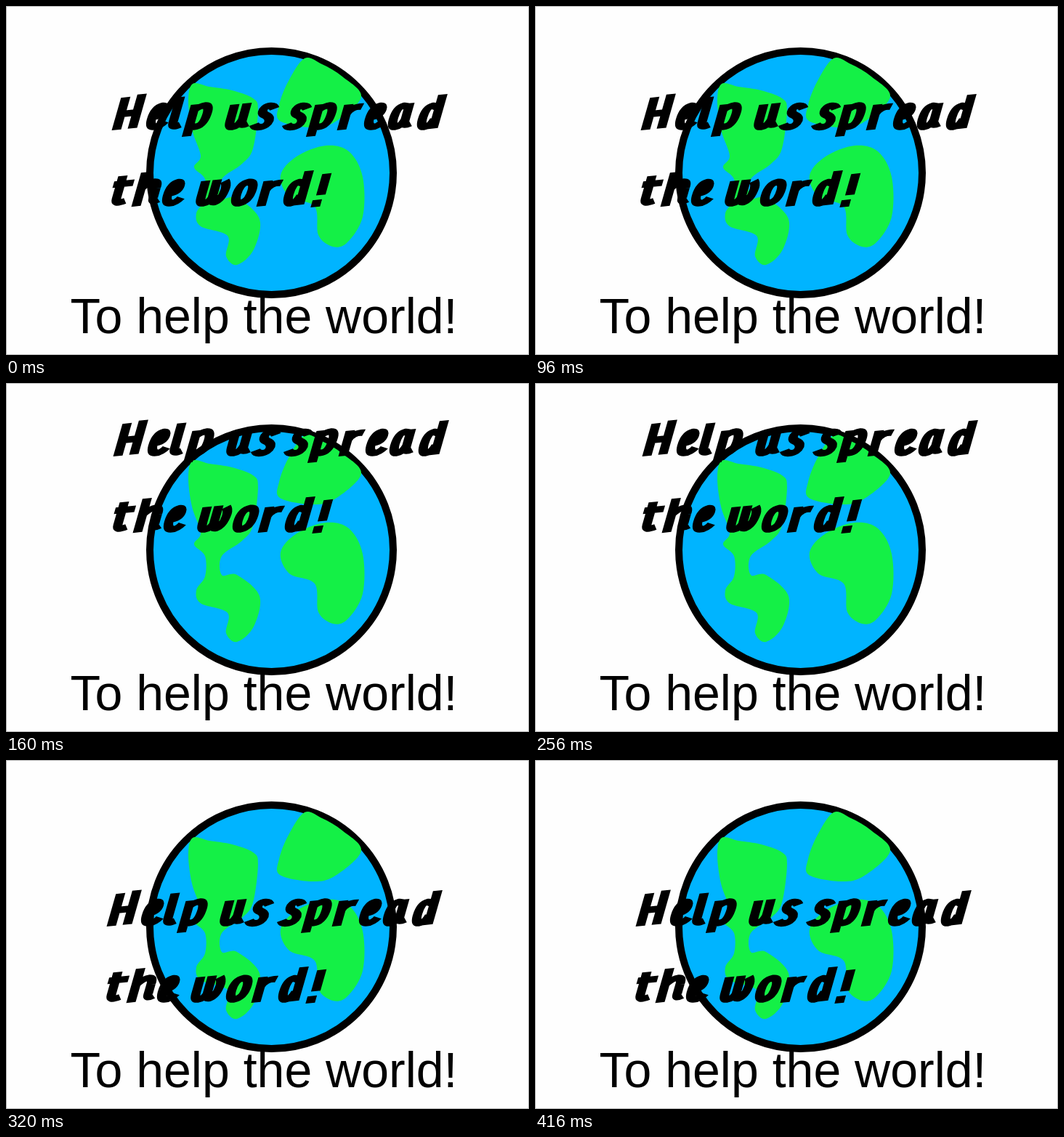
Animation of 720x480 px, one loop 480 ms. Source, as an HTML page:

```html
<!DOCTYPE html>
<html lang="en">
<head>
<meta charset="utf-8">
<title>Help us spread the word!</title>
<style>
  html, body { margin: 0; width: 100%; height: 100%; overflow: hidden; background: #fefefe; }
  svg { display: block; width: 720px; height: 480px; }
  #lands { fill: #14f046; }
  #slogan { fill: none; stroke: #000; stroke-width: 13; stroke-linejoin: round; }
  .caption { font: 68px "Liberation Sans", Arial, sans-serif; }
</style>
</head>
<body>
<svg viewBox="0 0 720 480">
  <rect width="720" height="480" fill="#fefefe"/>
  <circle cx="365.5" cy="229.5" r="167.5" fill="#00b4ff" stroke="#000" stroke-width="10"/>
  <g id="lands"></g>
  <text class="caption" x="88.5" y="450">To help the world!</text>
  <g id="slogan" role="img" aria-label="Help us spread the word!"></g>
  <rect x=".5" y=".5" width="719" height="479" fill="none" stroke="#b4b4b4"/>
</svg>
<script>
const make = (parent, d) => {
  const path = document.createElementNS("http://www.w3.org/2000/svg", "path");
  path.setAttribute("d", d);
  parent.append(path);
  return path;
};

// Closed Catmull-Rom outline through a few key points.
function blob(outline) {
  const points = outline.split(" ").map(p => p.split(",").map(Number));
  const n = points.length;
  const at = i => points[(i + n) % n];
  return points.reduce((d, b, i) => {
    const [a, c, e] = [at(i - 1), at(i + 1), at(i + 2)];
    const out = b.map((v, k) => v + (c[k] - a[k]) / 6);
    const into = c.map((v, k) => v - (e[k] - b[k]) / 6);
    return d + `C${out} ${into} ${c}`;
  }, `M${points[0]}`) + "Z";
}

const lands = document.getElementById("lands");
const west = "257,107 280,111 311,116 340,127 347,143 340,196 325,217 297,238 297,264 318,264 349,293 " +
  "341,335 318,356 303,344 305,316 268,303 262,285 274,266 274,238 259,222 268,206 256,170 251,130";
const north = "411,72 435,80 463,97 489,125 452,160 420,167 377,158 376,136 389,103";
const east = "440,192 472,200 491,235 491,290 470,325 450,331 430,315 425,276 390,262 378,233 400,207";
for (const land of [west, north, east]) make(lands, blob(land));

// Pen strokes on an upright grid; the nib matrix slants them and thins the horizontals.
const nib = "matrix(1 -.1 -.2 .7 0 0)";
const bowl = "M23-42Q18-46 14-46Q6-44 6-22Q6-5 13-5Q20-6 23-20";
const hooked = "M23-50V-14Q23-4 32-9";
const cup = "M6-50V-18Q6-5 13-5Q20-6 23-20";

// Each letter: advance width and strokes.
const letters = {
  " ": [14, ""],
  H: [45, "M7 0V-64M29 0V-67M7-31H29"],
  e: [33, "M7-25Q20-25 20-37Q20-46 15-46Q6-44 6-22Q6-5 15-5Q21-5 26-14"],
  l: [21, "M4-65V-16Q4-3 15-9"],
  p: [41, "M7 13V-50M7-38Q14-46 20-46Q28-45 27-27Q26-5 16-5H9"],
  u: [40, cup + hooked],
  s: [31, "M23-39Q20-46 14-46Q7-46 7-37Q7-31 14-27Q20-22 20-15Q19-5 10-5Q3-5 0-12"],
  r: [34, "M6 0V-50M6-30Q11-46 26-43"],
  a: [40, bowl + hooked],
  d: [43, bowl + "M25-67V0"],
  t: [29, "M4-60V-16Q4-3 17-9M-6-44H22"],
  h: [38, "M5 0V-67M5-34Q13-46 20-46Q27-45 26-32V-14Q26-4 34-9"],
  w: [48, cup + "M22-50V-18Q22-5 28-5Q36-8 37-30Q37-40 33-46"],
  o: [38, "M17-46Q6-44 6-22Q6-5 14-5Q26-7 26-30Q26-46 17-46Z"],
  "!": [24, "M7-64V-22M4-13V1"]
};

const slogan = document.getElementById("slogan");
function write(text, x, y) {
  for (const letter of text) {
    const [advance, strokes] = letters[letter];
    make(slogan, strokes).setAttribute("transform", `translate(${x} ${y}) ${nib}`);
    x += advance;
  }
}
write("Help us spread", 145, 171);
write("the word!", 145, 276);

// The slogan jumps between three places, holding each for a third of the loop.
const places = [[0, 0], [2, -70], [-7, 58]];
const steps = places.map(([x, y], i) => ({
  offset: i / places.length,
  transform: `translate(${x}px, ${y}px)`,
  easing: "step-end"
}));
steps.push({ ...steps[0], offset: 1 });
slogan.animate(steps, { duration: 480, iterations: Infinity });
</script>
</body>
</html>
```
